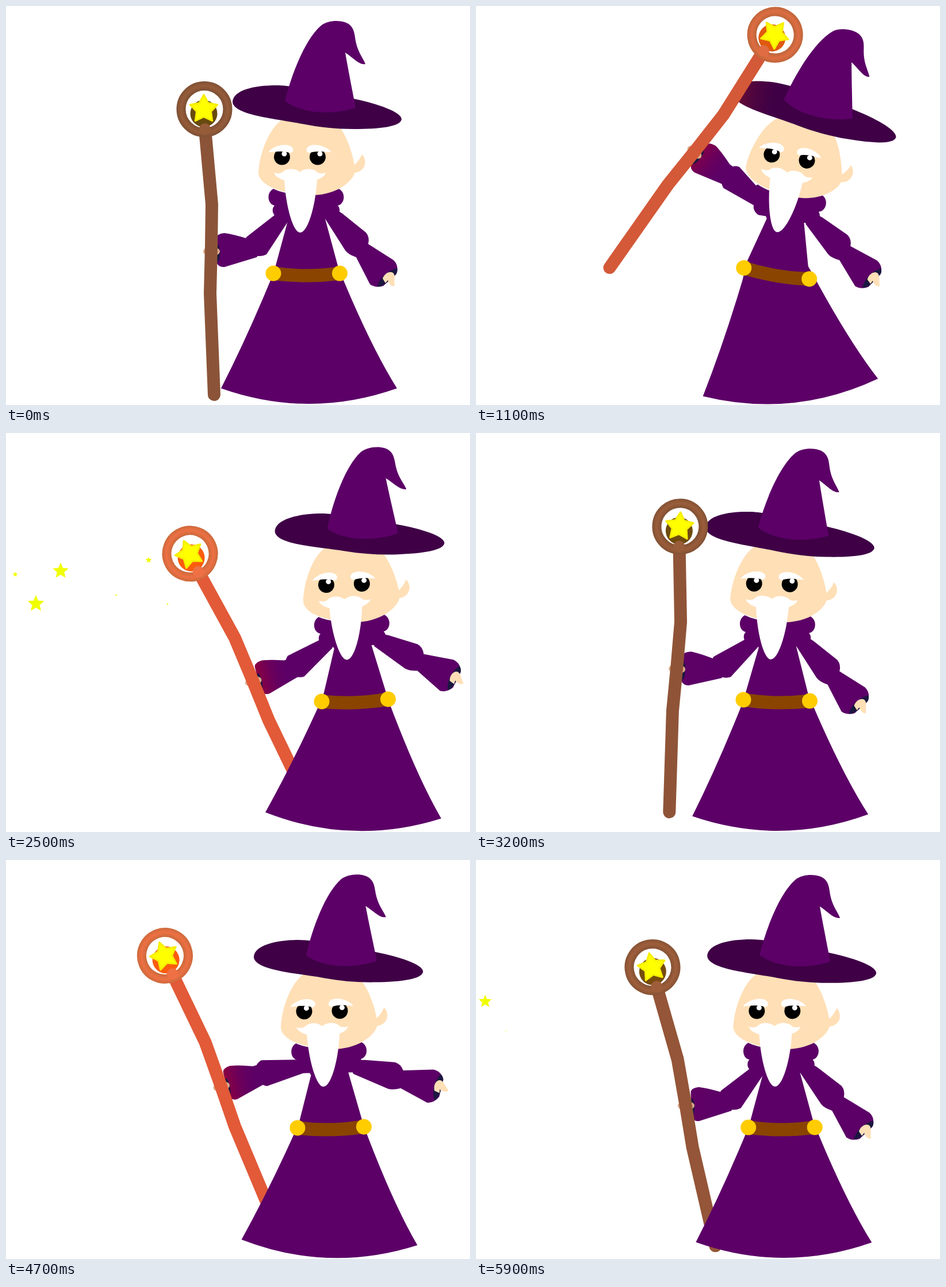
An HTML page that plays this animation: 807 by 694 pixels, repeating every 6.01 s.

```html
<!DOCTYPE html>
<html lang="en">
<head>
<meta charset="utf-8">
<title>Wizard</title>
<style>
  :root {
    --heat: 0%;
    --wood: color-mix(in srgb, #e25a38 var(--heat), #8b5438);
    --edge: color-mix(in srgb, #cc6a3c var(--heat), #7e5034);
    --mid: color-mix(in srgb, #ee7044 var(--heat), #965c3a);
    --back: color-mix(in srgb, #fa5c0e var(--heat), #684a0e);
  }
  html, body { margin: 0; width: 100%; height: 100%; overflow: hidden; background: #fff; }
  svg { display: block; width: 100%; height: 100%; }
  .robe { fill: #5c0067; }
  .skin { fill: #ffdfb6; }
  .navy { fill: #1b1740; }
  .gold { fill: #ffcc00; }
  .white { fill: #fff; }
  .wood { stroke: var(--wood); fill: none; stroke-width: 22; stroke-linecap: round; stroke-linejoin: round; }
  .back { fill: var(--back); }
  .knob { fill: var(--mid); }
  .edge { stop-color: var(--edge); }
  .mid { stop-color: var(--mid); }
</style>
</head>
<body>
<svg viewBox="0 0 807 694">
  <defs>
    <radialGradient id="rim" gradientUnits="userSpaceOnUse" cx="345" cy="179.5" r="48.5">
      <stop class="edge" offset=".68"/>
      <stop class="mid" offset=".84"/>
      <stop class="edge" offset="1"/>
    </radialGradient>
    <linearGradient id="sleeveGlow" gradientUnits="userSpaceOnUse" x1="366" y1="0" x2="425" y2="0">
      <stop offset="0" stop-color="#8c0040"/>
      <stop offset="1" stop-color="#5c0067" stop-opacity="0"/>
    </linearGradient>
    <linearGradient id="brimGlow" gradientUnits="userSpaceOnUse" x1="400" y1="0" x2="480" y2="0">
      <stop offset="0" stop-color="#701030"/>
      <stop offset="1" stop-color="#3f0046" stop-opacity="0"/>
    </linearGradient>
    <path id="brimShape" d="M394 166C396 146 432 138 470 138C500 138 560 151 608 162C645 170 688 184 688 197C686 210 650 214 605 214C575 214 545 211 515 205C470 196 394 190 394 166Z"/>
    <path id="foreShape" d="M434 403L418 404Q395 397 380 395Q368 396 366 402V446Q370 455 380 454L436 437L447 420Z"/>
    <path id="collar" class="robe" d="M522 328Q485 328 465 318C452 325 455 345 467 347C460 355 465 366 475 370H522Z"/>
    <g id="faceHalf">
      <circle cx="480" cy="262.5" r="14"/>
      <path class="white" d="M456 254.500C465 242 490 237 498 246C501 250 499 256 494 255.500C482 251.500 470 253 456 254.500Z"/>
      <path class="white" d="M512 290C505 282 490 282 483 287C478 293 470 291 466 290C470 303 498 308 512 306Z"/>
    </g>
  </defs>

  <g class="walk">
    <g class="upper">
      <path class="robe" d="M475 345L490 374L464 470H582L555 370L572 345Z"/>
      <g class="armR">
        <path class="robe" d="M560 345L585 361L626 394Q633 402 630 414L674 442Q684 452 679 466L656 487Q643 491 633 484L609 437Q595 432 590 425L555 370Z"/>
        <path class="navy" d="M680 456C664 460 648 475 646 488C656 488 664 480 672 472C679 468 682 462 680 456Z"/>
        <path class="skin" d="M655 474C659 463 670 460 674 465C678 470 674 480 676 486C672 490 666 483 664 477L660 482Z"/>
      </g>
      <g class="armL">
        <path class="robe" d="M475 350L468 363L418 402Q412 415 425 432Q442 438 453 432L491 374L500 345Z"/>
        <g class="foreL">
          <use href="#foreShape" class="robe"/>
          <use href="#foreShape" class="glow" fill="url(#sleeveGlow)"/>
          <ellipse class="navy" cx="368" cy="430" rx="4" ry="15"/>
          <ellipse cx="357.5" cy="427" rx="14.5" ry="8" fill="#dba98a"/>
        </g>
      </g>
      <use href="#collar"/>
      <use href="#collar" transform="matrix(-1 0 0 1 1044 0)"/>
      <path class="skin" d="M480 198C455 215 440 262 439 290C440 312 480 328 535 329C575 328 604 305 607 288C606 262 592 225 580 210L540 195Z"/>
      <path class="skin" d="M605 277Q614 270 619 258C629 268 626 288 606 290Z"/>
      <use href="#faceHalf"/>
      <use href="#faceHalf" transform="matrix(-1 0 0 1 1022 0)"/>
      <circle class="white" cx="484" cy="257" r="4.5"/>
      <circle class="white" cx="546" cy="257" r="4.5"/>
      <path class="white" d="M484 298C485 340 498 394 511.500 394C526 394 540 340 541 298Z"/>
      <use href="#brimShape" fill="#3f0046"/>
      <use href="#brimShape" class="brim" fill="url(#brimGlow)"/>
      <path class="robe" d="M485 165C497 118 520 58 548 34C562 23 590 24 599 34C607 42 606 52 609 65C613 82 622 92 625 101C614 103 604 90 590 81C595 110 602 145 608 177C570 190 515 188 485 165Z"/>
    </g>

    <g class="upper"><g class="armL"><g class="foreL"><g class="staff">
      <path class="wood" d="M347 224L358 345L357 420L355 500L362 676"/>
      <circle class="white" cx="345" cy="179.5" r="36"/>
      <circle class="back" cx="344" cy="187" r="23.5"/>
      <circle cx="345" cy="179.5" r="40.5" fill="none" stroke="url(#rim)" stroke-width="16"/>
      <circle class="knob" cx="346" cy="214" r="10"/>
      <path id="gem" fill="#ff0" stroke="#f6ee00" stroke-width="3" stroke-linejoin="round"/>
    </g></g></g></g>

    <path class="robe skirt" d="M468 455L463 470Q420 575 374 665Q527 719 680 665Q636 595 584 470L577 455Z"/>

    <g class="upper">
      <path d="M465 453Q522 462 580 453V477Q522 484 465 477Z" fill="#8a4400"/>
      <circle class="gold" cx="465" cy="465" r="13.5"/>
      <circle class="gold" cx="580.5" cy="465" r="13.5"/>
    </g>
  </g>
  <g id="sparks" fill="#f0ff00"></g>
</svg>
<script>
const LOOP = 6010, STEP = 100, STEPS = 60, CAST = 3000;
const RAISE_AT = 1000, CAST_AT = 2000, SWING = 1000;
const WALK = 84, SPARK_SIZE = 21, SPARK_LIFE = 330;

// Degrees each joint turns at the top of the raise and of the cast.
const joints = {
  upper: { pivot: [522, 465], raise: 10, cast: -4 },
  skirt: { pivot: [522, 465], raise: -6, cast: 4 },
  armR: { pivot: [564, 357], raise: -13, cast: -39 },
  armL: { pivot: [492, 354], raise: 78, cast: 27 },
  foreL: { pivot: [432, 418], raise: -46.5, cast: -50 }
};

// Sparkles: x, y, time of full size.
const sparks = [
  [339, 264, 2150], [281, 298, 2200], [192, 282, 2200], [248, 221, 2260],
  [95, 240, 2400], [52, 297, 2590], [16, 246, 2755]
];

const smooth = x => { x = Math.min(1, Math.max(0, x)); return x * x * (3 - 2 * x); };
const ramp = (t, from, to) => smooth((t - from) / (to - from));
const swing = (t, peak) => smooth(1 - Math.abs(t - peak) / SWING);

function star(x, y, r, inner) {
  const points = Array.from({ length: 10 }, (_, i) => {
    const a = (i * 36 - 90) * Math.PI / 180, q = i % 2 ? r * inner : r;
    return [x + q * Math.cos(a), y + q * Math.sin(a)];
  });
  return "M" + points.join("L") + "Z";
}

function setAll(name, attr, value) {
  for (const el of document.getElementsByClassName(name)) el.setAttribute(attr, value);
}

document.getElementById("gem").setAttribute("d", star(344, 179.5, 25, .53));
const sparkPaths = sparks.map(() => {
  const p = document.createElementNS("http://www.w3.org/2000/svg", "path");
  return document.getElementById("sparks").appendChild(p);
});

function draw(t) {
  const raise = swing(t, RAISE_AT), cast = swing(t, CAST_AT);
  for (const [name, j] of Object.entries(joints)) {
    setAll(name, "transform", `rotate(${j.raise * raise + j.cast * cast} ${j.pivot})`);
  }
  // The staff tips forward in the hand and stays so until the next cast.
  const tip = -2 * ramp(t, 0, RAISE_AT) - 8 * ramp(t, RAISE_AT, CAST_AT);
  setAll("staff", "transform", `rotate(${tip} 357 427)`);

  const back = ramp(t, 2500, CAST);
  setAll("walk", "transform", `translate(${WALK * (ramp(t, 1400, CAST_AT) - back)} 0)`);

  const heat = ramp(t, 0, 1500) - back;
  document.documentElement.style.setProperty("--heat", heat * 100 + "%");
  setAll("glow", "opacity", heat);
  setAll("brim", "opacity", raise ** 3);

  sparks.forEach(([x, y, peak], i) => {
    const r = SPARK_SIZE * (1 - Math.abs(t - peak) / SPARK_LIFE);
    sparkPaths[i].setAttribute("d", r > 0 ? star(x, y, r, .45) : "");
  });
}

const start = performance.now();
function tick() {
  const t = (performance.now() - start) % LOOP;
  const step = Math.min(STEPS - 1, Math.floor(t / STEP));
  draw(step * STEP % CAST);
  requestAnimationFrame(tick);
}
tick();
</script>
</body>
</html>
```
